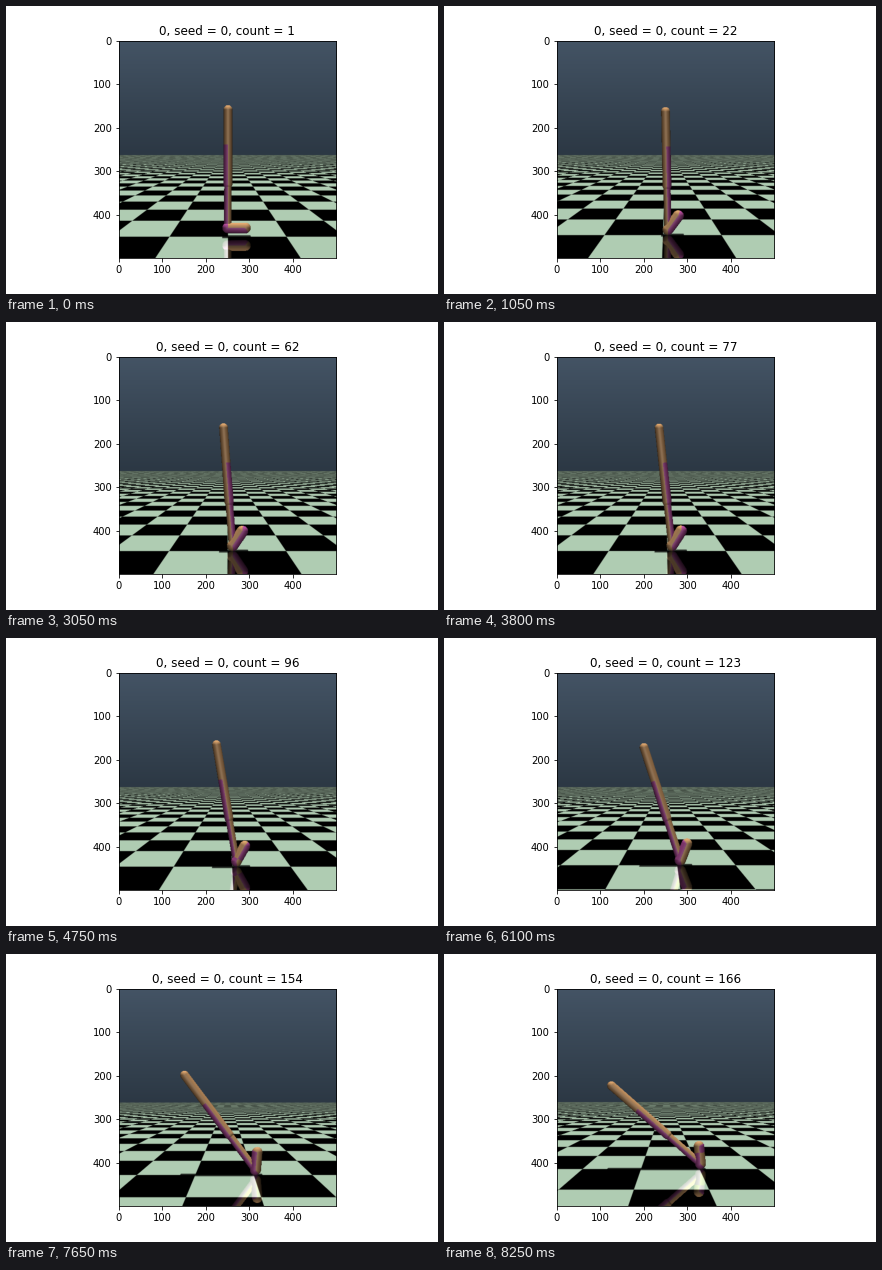
Write a matplotlib script that moves like this. It is 432 px wide and 288 px high and loops after 8300 ms.

```python
import numpy as np
import matplotlib.pyplot as plt
from matplotlib.animation import FuncAnimation

plt.rcParams.update({"font.family": "DejaVu Sans", "font.size": 10})

FRAMES, INTERVAL = 166, 50
SIZE, N = 500, 434             # scene units and rendered samples per side
FOCAL = 250 / np.tan(np.pi / 8)
DIST = 3.0                     # camera distance to the walker's plane
SCALE = FOCAL / DIST
TILE = 2 / 3
FAR = 43.0

TAN = np.array([0.8, 0.6, 0.4], np.float32)
PLUM = np.array([0.7, 0.3, 0.6], np.float32)
FLOOR = np.array([0.69, 0.80, 0.70], np.float32)
SKY_TOP = np.array([68, 84, 101]) / 255
SKY_LOW = np.array([44, 56, 68]) / 255

axis = ((np.arange(N) + 0.5) * SIZE / N).astype(np.float32)
sky_mix = np.clip(axis / 262, 0, 1)[:, None]
sky = (SKY_TOP + (SKY_LOW - SKY_TOP) * sky_mix)[:, None, :]
body_cols = slice(int(0.18 * N), int(0.76 * N))
body_rows = slice(int(0.27 * N), int(0.94 * N))


def unit(angle):
    return np.array([np.cos(angle), np.sin(angle)])


def walker(ankle, lean, toe_up, swing=0.0, tip=0.0):
    """Capsules (start, end, radius, colour) of the torso and both legs."""
    up = unit(np.pi / 2 + lean)
    hip, top = ankle + 0.95 * up, ankle + 1.35 * up
    parts = [(top, hip, 0.05, TAN)]
    for colour, turn, tilt in ((TAN, 0, 0), (PLUM, swing, tip)):
        down = unit(lean - np.pi / 2 + turn)
        knee, heel = hip + 0.45 * down, hip + 0.95 * down
        toe = heel + 0.2 * unit(toe_up + tilt)
        parts += [(hip, knee, 0.05, colour), (knee, heel, 0.04, colour),
                  (heel, toe, 0.06, colour)]
    return parts


def mass_centre(parts):
    mass = [r * r * (np.hypot(*(b - a)) + 4 * r / 3) for a, b, r, _ in parts]
    return np.average([(a + b) / 2 for a, b, _, _ in parts], axis=0, weights=mass)


REST = mass_centre(walker(np.array([0, 0.1]), 0, 0))


def pose(k):
    """Camera height, camera x and the capsules as the camera sees them."""
    lean = 0.0383 * np.sinh(0.023 * k)
    drop = min(1, k / 11) ** 2
    lift = np.clip(k / 16, 0, 1)
    lift = lift * lift * (3 - 2 * lift)
    toe_up = lean + lift * (0.93 - 0.14 * lean)
    swing = 0.012 * np.sin(np.pi * (k - 13) / 80)

    # the heel slips at first, then rolls; the camera follows the mass centre
    ankle = np.array([0.112 * lift - 0.06 * toe_up, 0.1 - 0.04 * drop])
    cam_x, rise = mass_centre(walker(ankle, lean, toe_up)) - REST
    ankle[0] -= cam_x
    return 1 + rise, cam_x, walker(ankle, lean, toe_up, swing, -0.02)


def render_body(parts, height, u, v):
    """Shade the capsules on the grid u x v; returns colour and mask."""
    x = ((u - 250) / SCALE)[None, :]
    z = (height - (v - 250) / SCALE)[:, None]
    depth = np.zeros((len(v), len(u)), np.float32)
    colour = np.zeros(depth.shape + (3,), np.float32)
    for a, b, r, tint in parts:
        a, d = a.astype(np.float32), (b - a).astype(np.float32)
        t = np.clip(((x - a[0]) * d[0] + (z - a[1]) * d[1]) / (d @ d), 0, 1)
        nx, nz = (x - a[0] - t * d[0]) / r, (z - a[1] - t * d[1]) / r
        facing = 1 - nx * nx - nz * nz
        rows, cols = np.nonzero(facing > 0)
        near = np.sqrt(facing[rows, cols])
        front = near * r > depth[rows, cols]
        rows, cols, near = rows[front], cols[front], near[front]
        depth[rows, cols] = near * r
        light = 0.14 + 0.42 * near + 0.9 * np.maximum(nz[rows, cols], 0)
        shine = 0.1 * near ** 20
        colour[rows, cols] = np.minimum(light[:, None] * tint + shine[:, None], 1)
    return colour, depth > 0


def soft_square(x, width):
    """Square wave of half-period TILE, averaged over the given width."""
    def ramp(s):
        m = np.mod(s, 2 * TILE)
        return np.minimum(m, 2 * TILE - m)
    return (ramp(x + width / 2) - ramp(x - width / 2)) / width


def render_floor(height, cam_x, parts, v):
    d = (FOCAL * height / (v - 250))[:, None]
    y = d - DIST
    wx = 1.5 * d / FOCAL
    wy = 1.5 * d * d / (FOCAL * height)
    rel = (axis - 250)[None, :] * d / FOCAL
    light = 0.5 + 0.5 * soft_square(rel + cam_x, wx) * soft_square(y, wy)

    # light falls straight down, so the shadow is a thin band
    left = min(min(a[0], b[0]) - r for a, b, r, _ in parts)
    right = max(max(a[0], b[0]) + r for a, b, r, _ in parts)
    across = np.clip((0.05 - np.abs(y)) / wy + 0.5, 0, 1)
    along = np.clip(np.minimum(rel - left, right - rel) / wx + 0.5, 0, 1)
    light = light * (1 - 0.78 * across * along)
    return light[:, :, None] * FLOOR


def render(k):
    height, cam_x, parts = pose(k)
    img = np.empty((N, N, 3), np.float32)
    img[:] = sky

    first = np.searchsorted(axis, 250 + FOCAL * height / FAR)
    img[first:] = render_floor(height, cam_x, parts, axis[first:])

    ground = 250 + SCALE * height
    start = np.searchsorted(axis, ground)
    mirror, _ = render_body(parts, height, axis[body_cols],
                            2 * ground - axis[start:])
    img[start:, body_cols] += 0.5 * mirror

    body, mask = render_body(parts, height, axis[body_cols], axis[body_rows])
    img[body_rows, body_cols][mask] = body[mask]
    return np.clip(img, 0, 1)


fig, ax = plt.subplots(figsize=(6, 4), dpi=72)
fig.subplots_adjust(left=0.125, right=0.9, bottom=0.125, top=0.88)
picture = ax.imshow(render(0), extent=(-0.5, 499.5, 499.5, -0.5))
ax.set_xticks(range(0, 500, 100))
ax.set_yticks(range(0, 500, 100))
title = ax.set_title("", fontsize=12)


def update(k):
    picture.set_data(render(k))
    title.set_text(f"0, seed = 0, count = {k + 1}")
    return picture, title


anim = FuncAnimation(fig, update, frames=FRAMES, interval=INTERVAL,
                     repeat=True, repeat_delay=0)
plt.show()
```
